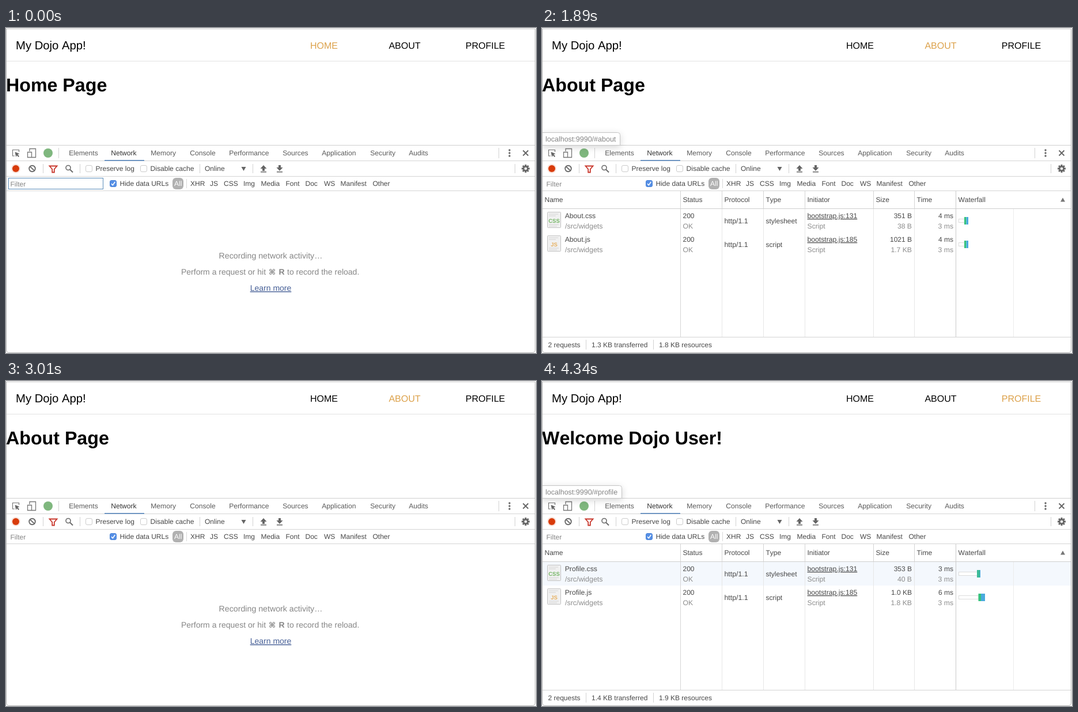
An HTML page for the animation above (4410 ms loop, 920 by 564 pixels).

```html
<!DOCTYPE html>
<html lang="en">
<head>
<meta charset="utf-8">
<title>Dojo app and network panel</title>
<style>
html, body { margin: 0; width: 100%; height: 100%; overflow: hidden; background: #fff; }
svg { display: block; width: 920px; height: 564px; font-family: "Liberation Sans", Arial, sans-serif; }
text { white-space: pre; font-kerning: none; text-rendering: geometricPrecision; }
.ui { font-size: 12px; fill: #484848; }
.dim { font-size: 12.2px; fill: #8c8c8c; }
.msg { font-size: 14px; fill: #868686; }
.nav { font-size: 16px; text-anchor: middle; }
.end { text-anchor: end; }
.link { text-decoration: underline 1px; text-underline-offset: 1px; }
</style>
</head>
<body>
<svg id="stage" viewBox="0 0 920 564" xmlns="http://www.w3.org/2000/svg"></svg>
<script>
const LOOP = 4410;
const stage = document.getElementById('stage');

function add(parent, name, attrs = {}, label) {
  const el = document.createElementNS('http://www.w3.org/2000/svg', name);
  for (const key in attrs) el.setAttribute(key, attrs[key]);
  if (label !== undefined) el.textContent = label;
  parent.append(el);
  return el;
}
const group = (parent = stage) => add(parent, 'g');
const text = (p, x, y, label, cls = 'ui', more = {}) => add(p, 'text', { x, y, class: cls, ...more }, label);
const rect = (p, x, y, width, height, fill, more = {}) => add(p, 'rect', { x, y, width, height, fill, ...more });
const path = (p, d, stroke, width = 1, fill = 'none') => add(p, 'path', { d, stroke, 'stroke-width': width, fill });
const circle = (p, cx, cy, r, fill, more = {}) => add(p, 'circle', { cx, cy, r, fill, ...more });
const hline = (p, y, color) => rect(p, 1, y, 917, 1, color);
const vline = (p, x, y, h, color) => rect(p, x, y, 1, h, color);
const show = (el, on) => el.setAttribute('visibility', on ? 'inherit' : 'hidden');

// Web page
text(stage, 17, 37, 'My Dojo App!', '', { 'font-size': 20.3 });
const hoverBox = rect(stage, 622, 2, 140, 55, '#d8e6f1');
const navItems = ['HOME', 'ABOUT', 'PROFILE'].map((label, i) => text(stage, 552 + 140 * i, 36, label, 'nav'));
hline(stage, 57, '#e2e2e2');
const title = text(stage, 0, 110, '', '', { 'font-size': 32.2, 'font-weight': 700 });

// Panel tabs
hline(stage, 203, '#cfcfcf');
[[110, 'Elements'], [183, 'Network'], [252, 'Memory'], [320, 'Console'], [388, 'Performance'],
 [481, 'Sources'], [549, 'Application'], [633, 'Security'], [700, 'Audits']]
  .forEach(([x, label]) => text(stage, x - 0.7, 221, label, 'ui', { style: 'font-size:12.1px;fill:' + (label === 'Network' ? '#333' : '#5a5a5a') }));
hline(stage, 230, '#d4d4d4');
rect(stage, 171, 229, 69, 1.6, '#5686bd');
path(stage, 'M15 222H11.5V211.5H22.5V215', '#777', 1.2);
path(stage, 'M15.5 215L23.5 218.2L20.3 219.6L23 222.6L21.6 224L18.8 220.9L17.3 224Z', 'none', 0, '#666');
path(stage, 'M41 214V209.5H51.5V224.5H45', '#777', 1.3);
path(stage, 'M37.5 215.5H44.5V224.5H37.5Z', '#777', 1.3);
circle(stage, 73, 217, 8, '#7fb77e');
vline(stage, 91, 208, 18, '#d2d2d2');
vline(stage, 855, 208, 18, '#d2d2d2');
[212, 217, 222].forEach(y => circle(stage, 874, y, 1.7, '#666'));
path(stage, 'M897.5 212.5L906.5 221.5M906.5 212.5L897.5 221.5', '#666', 1.9);

// Panel toolbar
circle(stage, 17, 244, 8, '#f9e3dc');
circle(stage, 17, 244, 6, '#d83b0a');
const clearIcon = path(stage, 'M40.2 244a5.3 5.3 0 1 0 10.6 0a5.3 5.3 0 1 0 -10.6 0M41.8 240.3L49.2 247.7', '#6a6a6a', 1.9);
path(stage, 'M75.5 239.5H88.5L83.8 245V250.5H80.2V245Z', '#c8362b', 1.8);
circle(stage, 108, 242.5, 4, 'none', { stroke: '#6a6a6a', 'stroke-width': 1.6 });
path(stage, 'M111 245.5L116 250.5', '#6a6a6a', 2);
[64, 128, 336, 428, 883].forEach(x => vline(stage, x, 236, 16, '#d2d2d2'));
const checkbox = (x, y, fill, stroke) => rect(stage, x + 0.5, y + 0.5, 11, 11, fill, { rx: 2.5, stroke });
checkbox(138, 238, '#fff', '#cccccc');
checkbox(233, 238, '#fff', '#cccccc');
text(stage, 155.5, 248, 'Preserve log');
text(stage, 250.5, 248, 'Disable cache', 'ui', { style: 'font-size:12.1px' });
text(stage, 345, 248, 'Online');
path(stage, 'M408.5 241H416.5L412.5 248Z', 'none', 0, '#666');
path(stage, 'M447 238L452.5 244H449V248H445V244H441.5Z M442 249H452V250.5H442Z', 'none', 0, '#666');
path(stage, 'M475 248L480.5 242H477V238H473V242H469.5Z M470 249H480V250.5H470Z', 'none', 0, '#666');
for (let i = 0; i < 4; i++) {
  rect(stage, 900.5, 237, 3, 14, '#666', { transform: `rotate(${i * 45} 902 244)` });
}
circle(stage, 902, 244, 3.6, '#fff', { stroke: '#666', 'stroke-width': 2.6 });
hline(stage, 257, '#d4d4d4');

// Filter bar
const focusRing = rect(stage, 4.5, 260.5, 164, 19, '#fff', { stroke: '#5a8cba', 'stroke-width': 1 });
const filterText = text(stage, 7.5, 274.5, 'Filter', 'ui', { style: 'fill:#858585' });
checkbox(180, 264, '#568fe6', '#4a84d8');
path(stage, 'M183 270.2L185.3 272.7L189.3 267', '#fff', 1.6);
text(stage, 197.5, 274, 'Hide data URLs');
rect(stage, 289, 260, 19, 20, '#b1b1b1', { rx: 6 });
text(stage, 292, 274, 'All', 'ui', { style: 'fill:#fff' });
vline(stage, 313, 262, 16, '#d8d8d8');
[[320, 'XHR'], [354, 'JS'], [378, 'CSS'], [412, 'Img'], [442.5, 'Media'], [485.5, 'Font'],
 [519.5, 'Doc'], [552, 'WS'], [580.5, 'Manifest'], [636.5, 'Other']]
  .forEach(([x, label]) => text(stage, x, 274, label));
hline(stage, 282, '#d4d4d4');

// Empty panel
const empty = group();
text(empty, 459.5, 400, 'Recording network activity…', 'msg', { 'text-anchor': 'middle', style: 'font-size:14.2px' });
text(empty, 304, 428, 'Perform a request or hit', 'msg');
text(empty, 456, 428, '⌘', 'msg', { style: 'font-family:"DejaVu Sans",sans-serif;font-size:13px;font-weight:700' });
text(empty, 473.5, 428, 'R', 'msg', { 'font-weight': 700 });
text(empty, 488, 428, 'to record the reload.', 'msg');
text(empty, 423.7, 456, 'Learn more', 'msg link', { style: 'fill:#465f96' });

// Request table
function fileIcon(p, y, label, color) {
  rect(p, 9.5, y + 0.5, 23, 27, '#f1f1f1', { stroke: '#c2c2c2', rx: 1 });
  path(p, `M12 ${y + 4}H28M12 ${y + 7}H24M12 ${y + 22}H29M12 ${y + 25}H26`, '#d3d3d3');
  text(p, 21, y + 19, label, '', { 'text-anchor': 'middle', 'font-size': 9.5, 'font-weight': 700, fill: color });
}

function makeTable(rows, footer) {
  const g = group();
  const hover = rect(g, 1, 314, 917, 41, '#f4f8fd');
  [[5, 'Name'], [245, 'Status'], [317, 'Protocol'], [389, 'Type'], [461, 'Initiator'],
   [580, 'Size'], [651, 'Time'], [723, 'Waterfall']]
    .forEach(([x, label]) => text(g, x - 0.5, 302, label));
  path(g, 'M900 301.5H908L904 294.5Z', 'none', 0, '#777');
  hline(g, 313, '#cfcfcf');
  [240, 312, 384, 456, 575, 646].forEach(x => {
    vline(g, x, 283, 30, '#d4d4d4');
    vline(g, x, 314, 222, '#e6e6e6');
  });
  vline(g, 240, 314, 222, '#d6d6d6');
  vline(g, 718, 283, 253, '#cacaca');
  vline(g, 818, 314, 222, '#ececec');

  rows.forEach((r, i) => {
    const y = 330 + 41 * i;
    const low = y + 17.5;
    fileIcon(g, y - 11, i ? 'JS' : 'CSS', i ? '#e6b061' : '#74b565');
    text(g, 39.7, y, r.name, 'ui', { style: 'font-size:12.2px' });
    text(g, 40, low, '/src/widgets', 'dim', { style: 'font-size:12.4px' });
    text(g, 244.5, y, '200');
    text(g, 244.5, low, 'OK', 'dim');
    text(g, 316.5, y + 9, 'http/1.1', 'ui', { style: 'font-size:12.3px' });
    text(g, 388.5, y + 9, i ? 'script' : 'stylesheet');
    text(g, 460.5, y, 'bootstrap.js:' + (i ? 185 : 131), 'ui link', { style: 'font-size:12.2px' });
    text(g, 460.5, low, 'Script', 'dim');
    text(g, 642, y, r.size[0], 'ui end');
    text(g, 642, low, r.size[1], 'dim end');
    text(g, 714, y, r.time, 'ui end');
    text(g, 714, low, '3 ms', 'dim end');
    const [wait, green, blue] = r.bar;
    rect(g, 723.5, y + 1.5, wait - 723, 6, '#fff', { stroke: '#dcdcdc' });
    rect(g, wait, y - 2, green - wait, 13, r.tint || '#35c27c');
    rect(g, green, y - 2, blue - green, 13, '#4aaade');
  });

  hline(g, 536, '#d4d4d4');
  ['2 requests', ...footer].forEach((label, i) => text(g, [10.5, 86, 203][i], 554, label));
  vline(g, 76, 541, 17, '#d2d2d2');
  vline(g, 193, 541, 17, '#d2d2d2');
  return { g, hover };
}
const aboutTable = makeTable([
  { name: 'About.css', size: ['351 B', '38 B'], time: '4 ms', bar: [733, 736.5, 740] },
  { name: 'About.js', size: ['1021 B', '1.7 KB'], time: '4 ms', bar: [733, 736.5, 740] }
], ['1.3 KB transferred', '1.8 KB resources']);
const profileTable = makeTable([
  { name: 'Profile.css', size: ['353 B', '40 B'], time: '3 ms', bar: [755, 760, 761], tint: '#3dbb98' },
  { name: 'Profile.js', size: ['1.0 KB', '1.8 KB'], time: '6 ms', bar: [757.5, 762, 769] }
], ['1.4 KB transferred', '1.9 KB resources']);

// Status bubble
const bubble = group();
bubble.style.filter = 'drop-shadow(0 3px 6px rgba(0,0,0,.16))';
const bubbleBox = path(bubble, '', '#c4c4c4', 1, '#fff');
const bubbleText = text(bubble, 6, 197, '', '', { 'font-size': 12.5, fill: '#858585' });

// Window edge
path(stage, 'M0.5 2V558Q0.5 563.5 6 563.5H913Q918.5 563.5 918.5 558V2', '#b5b5b5');
rect(stage, 0, 1, 919, 1, '#c6c6c6');

// Each step: start time and what changes from then on
const steps = [
  [0, { page: 0, hover: -1, focus: true, table: null, link: '', clear: false, row: false }],
  [350, { hover: 1, link: 'about' }],
  [560, { focus: false }],
  [840, { page: 1, table: aboutTable }],
  [1400, { hover: -1 }],
  [2240, { link: '' }],
  [2310, { clear: true }],
  [2450, { table: null }],
  [2870, { clear: false }],
  [3220, { hover: 2, link: 'profile' }],
  [3640, { page: 2, table: profileTable }],
  [4130, { hover: -1 }],
  [4200, { row: true }]
];
const titles = ['Home Page', 'About Page', 'Welcome Dojo User!'];

function draw(t) {
  const s = {};
  for (const [at, change] of steps) if (t >= at) Object.assign(s, change);

  title.textContent = titles[s.page];
  navItems.forEach((el, i) =>
    el.setAttribute('fill', i === s.hover ? '#74b9ec' : i === s.page ? '#dca14a' : '#000'));
  show(hoverBox, s.hover > 0);
  hoverBox.setAttribute('x', 482 + 140 * s.hover);

  show(focusRing, s.focus);
  filterText.setAttribute('y', s.focus ? 274.5 : 275);
  clearIcon.setAttribute('stroke', s.clear ? '#2b2b2b' : '#6a6a6a');
  show(empty, !s.table);
  for (const table of [aboutTable, profileTable]) {
    show(table.g, s.table === table);
    show(table.hover, s.table === table && s.row);
  }

  show(bubble, s.link);
  bubbleText.textContent = 'localhost:9990/#' + s.link;
  const right = s.link === 'profile' ? 138.5 : 135.5;
  bubbleBox.setAttribute('d', `M0.5 181.5H${right - 4}Q${right} 181.5 ${right} 185.5V203.5H0.5Z`);
  bubble.setAttribute('opacity', t > 2100 && t < 2240 ? (2240 - t) / 140 : 1);
}

const start = performance.now();
function tick() {
  draw((performance.now() - start) % LOOP);
  requestAnimationFrame(tick);
}
draw(0);
requestAnimationFrame(tick);
</script>
</body>
</html>
```
